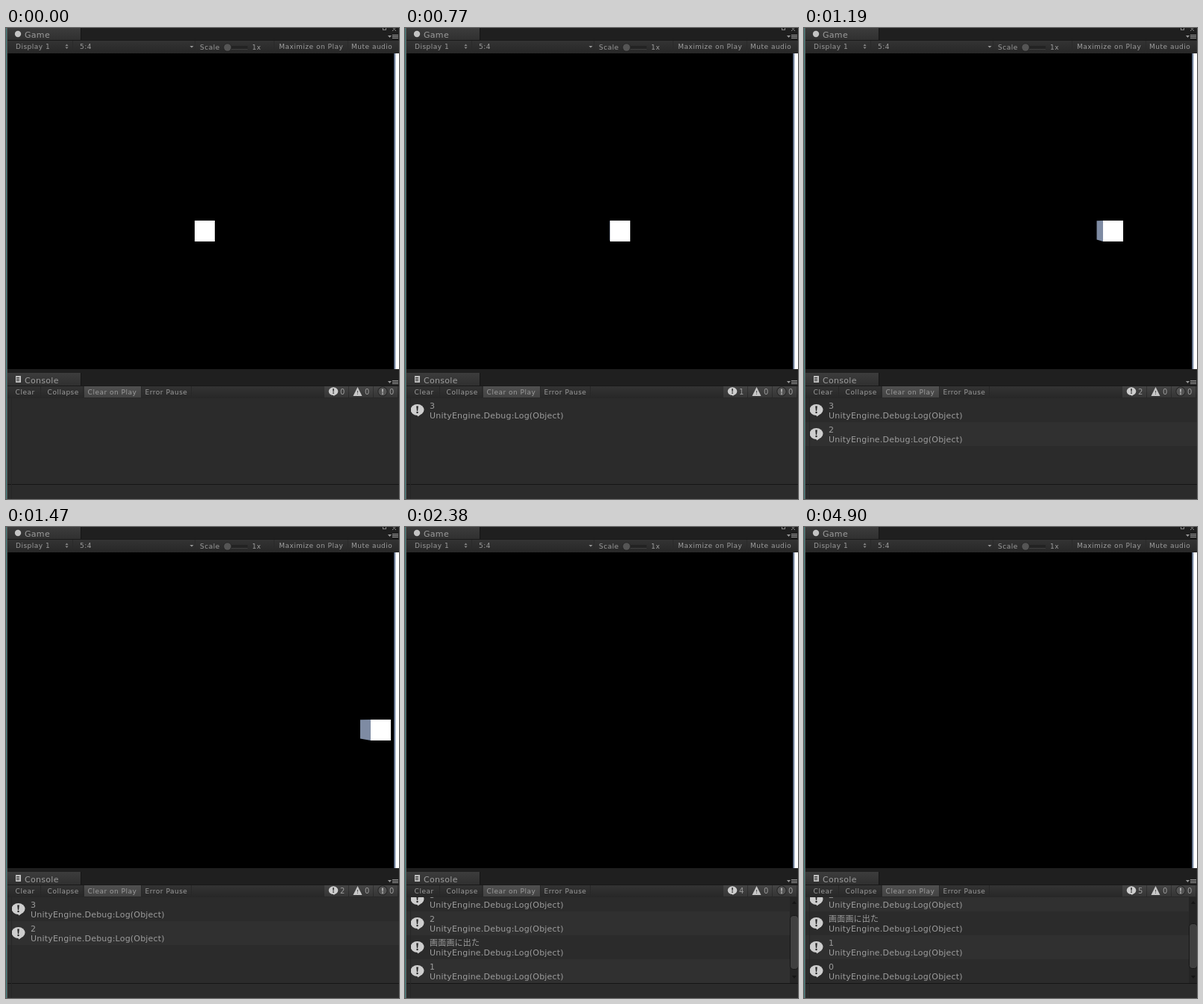
Write an HTML page with a canvas that moves like this. It is 527x631 px and loops after 4.97 s.

```html
<!DOCTYPE html>
<html lang="en">
<head>
<meta charset="utf-8">
<title>Game and console panels</title>
<style>
html, body { margin: 0; width: 100%; height: 100%; overflow: hidden; background: #1f1f1f; }
canvas { display: block; }
</style>
</head>
<body>
<canvas id="stage" width="527" height="631"></canvas>
<script>
const ctx = document.getElementById('stage').getContext('2d');
const LOOP = 4970, STEP = 70;
const LIST_TOP = 496, LIST_BOTTOM = 611, ROW = 32;
const INK = '#9c9c9c', BACK = '#2b2b2b';

// Time at which each message is logged
const logs = [[70, '3'], [1050, '2'], [1610, '画面画に出た'], [2030, '1'], [3010, '0']];

function rect(x, y, w, h, fill) {
  ctx.fillStyle = fill;
  ctx.fillRect(x, y, w, h);
}

function shade(x, y, w, h, top, bottom) {
  const g = ctx.createLinearGradient(0, y, 0, y + h);
  g.addColorStop(0, top);
  g.addColorStop(1, bottom);
  rect(x, y, w, h, g);
}

function poly(fill, ...points) {
  ctx.fillStyle = fill;
  ctx.beginPath();
  points.forEach(([x, y]) => ctx.lineTo(x, y));
  ctx.fill();
}

function oval(x, y, rx, ry, fill) {
  ctx.fillStyle = fill;
  ctx.beginPath();
  ctx.ellipse(x, y, rx, ry, 0, 0, 7);
  ctx.fill();
}

function text(str, x, y, size = 9, spacing = 0.5) {
  ctx.font = `${size}px "DejaVu Sans", "Noto Sans CJK JP", sans-serif`;
  ctx.letterSpacing = spacing + 'px';
  ctx.fillStyle = INK;
  ctx.fillText(str, x, y);
}

function bang(x, y, s, fill) {
  poly(fill, [x - 1.3 * s, y - 5 * s], [x + 1.3 * s, y - 5 * s], [x + 0.6 * s, y + 1.6 * s], [x - 0.6 * s, y + 1.6 * s]);
  oval(x, y + 3.5 * s, 1.2 * s, 1.2 * s, fill);
}

function bubble(x, y, s) {
  const fill = '#cecece';
  oval(x, y - 0.5 * s, 9 * s, 7.6 * s, fill);
  poly(fill, [x - 1 * s, y + 6 * s], [x + 4 * s, y + 6 * s], [x + 1 * s, y + 8.5 * s]);
  bang(x, y - 0.5 * s, s, '#222');
}

function panelHead(y, tabTop, toolbarTop, title) {
  rect(2, y, 525, toolbarTop - y, '#1f1f1f');
  shade(2, tabTop, 98, toolbarTop - tabTop, '#3c3c3c', '#303030');
  rect(100, tabTop, 1, toolbarTop - tabTop, '#151515');
  text(title, 25, toolbarTop - 3, 11, 0.3);
  poly('#999', [512, toolbarTop - 6], [517, toolbarTop - 6], [514.5, toolbarTop - 3]);
  for (let i = 0; i < 3; i++) rect(518, toolbarTop - 7 + i * 2, 8, 1, '#999');
}

function toolbar(y, h) {
  shade(2, y, 525, h, '#343434', '#272727');
  rect(2, y, 525, 1, '#191919');
}

function gamePanel() {
  panelHead(0, 0, 16, 'Game');
  oval(16, 8, 4.2, 4.2, '#c4c4c4');
  ctx.strokeStyle = '#888';
  ctx.lineWidth = 1;
  ctx.strokeRect(505.5, -2.5, 4, 5);
  ctx.beginPath();
  ctx.moveTo(518, -1); ctx.lineTo(523, 4);
  ctx.moveTo(523, -1); ctx.lineTo(518, 4);
  ctx.stroke();

  toolbar(16, 18);
  text('Display 1', 13, 28);
  poly('#888', [79.5, 24], [83.5, 24], [81.5, 21.5]);
  poly('#888', [79.5, 25.5], [83.5, 25.5], [81.5, 28]);
  for (const x of [89, 253, 359, 458]) rect(x, 17, 1, 16, '#2a2a2a');
  text('5:4', 99, 28);
  poly('#999', [246.5, 24], [251.5, 24], [249, 26.5]);
  text('Scale', 260, 29);
  rect(293, 24, 31, 4, '#232323');
  rect(293, 28, 31, 1, '#3f3f3f');
  oval(297, 26, 5.5, 5.5, '#222');
  oval(297, 26, 4.8, 4.8, '#555');
  text('1x', 330, 29);
  text('Maximize on Play', 366, 28);
  text('Mute audio', 463, 28);

  rect(2, 34, 525, 423, '#000');
  rect(520, 34, 1, 423, '#46556b');
  rect(521, 34, 1, 423, '#8190a8');
  rect(522, 34, 1, 423, '#c6cedb');
  rect(523, 34, 4, 423, '#fff');
}

// Horizontal shift: speed ramps up, then stays constant
function shiftAt(t) {
  const start = 553, ramp = 333, speed = 0.314;
  const s = Math.max(0, t - start);
  return speed * (s < ramp ? s * s / (2 * ramp) : s - ramp / 2);
}

function cube(t) {
  const cx = 266.5, cy = 245.5, depth = 0.937;
  const left = Math.round(cx - 13.5 + shiftAt(t)), right = left + 27, top = 258, bottom = 286;
  const far = (x, y) => [cx + (x - cx) * depth, cy + (y - cy) * depth];
  ctx.save();
  ctx.beginPath();
  ctx.rect(2, 34, 518, 423);
  ctx.clip();
  if (left > cx) poly('#7e8ba3', [left, top], [left, bottom], far(left, bottom), far(left, top + 1));
  rect(left, top, right - left, bottom - top, '#fff');
  ctx.restore();
}

function consolePanel(count) {
  panelHead(457, 462, 479, 'Console');
  rect(13, 466, 7, 9, '#c0c0c0');
  for (let y = 468; y < 473; y += 2) rect(14, y, 4, 1, '#333');

  toolbar(479, 17);
  shade(105, 480, 76, 15, '#505050', '#434343');
  text('Clear', 12.6, 491);
  text('Collapse', 55.6, 491);
  text('Clear on Play', 109.6, 491);
  text('Error Pause', 186.6, 491);
  for (const x of [46, 103, 181, 248]) rect(x, 480, 1, 15, '#272727');

  [427, 460, 493].forEach(x => shade(x, 480, 32, 15, '#454545', '#353535'));
  bubble(439, 487, 0.7);
  text(count, 448, 491, 10, 0);
  poly('#c8c8c8', [471.5, 481], [477.5, 493], [465.5, 493]);
  bang(471.5, 488.5, 0.5, '#555');
  text('0', 481, 491, 10, 0);
  oval(505, 487, 6.5, 6.5, '#1c1c1c');
  oval(505, 487, 5.7, 5.7, '#555');
  bang(505, 487.5, 0.75, '#c0c0c0');
  text('0', 514, 491, 10, 0);
}

function logList(count) {
  const height = LIST_BOTTOM - LIST_TOP;
  const scroll = Math.max(0, count * ROW - height);
  rect(2, LIST_TOP, 525, height, BACK);
  ctx.save();
  ctx.beginPath();
  ctx.rect(2, LIST_TOP, 525, height);
  ctx.clip();
  logs.slice(0, count).forEach(([, msg], i) => {
    const y = LIST_TOP + i * ROW - scroll;
    rect(2, y, 525, ROW, i % 2 ? '#303030' : BACK);
    bubble(16.5, y + 16, 1);
    text(msg, 33, y + 14, 11, 0.2);
    text('UnityEngine.Debug:Log(Object)', 33, y + 27, 11, 0.2);
  });
  if (scroll) scrollbar(count);
  ctx.restore();
  rect(2, LIST_BOTTOM, 525, 20, BACK);
  rect(2, LIST_BOTTOM, 525, 1, '#151515');
  rect(7, LIST_TOP, 1, 135, '#262626');
}

function scrollbar(count) {
  const top = count > 4 ? 531 : 520, bottom = count > 4 ? 592 : 593;
  rect(516, LIST_TOP, 11, 115, '#252525');
  poly('#161616', [519, 505], [525, 505], [522, 501]);
  poly('#161616', [519, 601], [525, 601], [522, 605]);
  ctx.fillStyle = '#404040';
  ctx.strokeStyle = '#171717';
  ctx.beginPath();
  ctx.roundRect(516.5, top + 0.5, 11, bottom - top - 1, 4);
  ctx.fill();
  ctx.stroke();
}

function draw(t) {
  const count = logs.filter(([at]) => t >= at).length;
  gamePanel();
  cube(t);
  consolePanel(count);
  logList(count);
  rect(0, 0, 1, 631, '#3f7f7d');
  rect(1, 0, 1, 631, '#5c5c5c');
}

const begin = performance.now();
function tick() {
  const t = (performance.now() - begin) % LOOP;
  draw(Math.floor(t / STEP) * STEP);
  requestAnimationFrame(tick);
}
tick();
</script>
</body>
</html>
```
